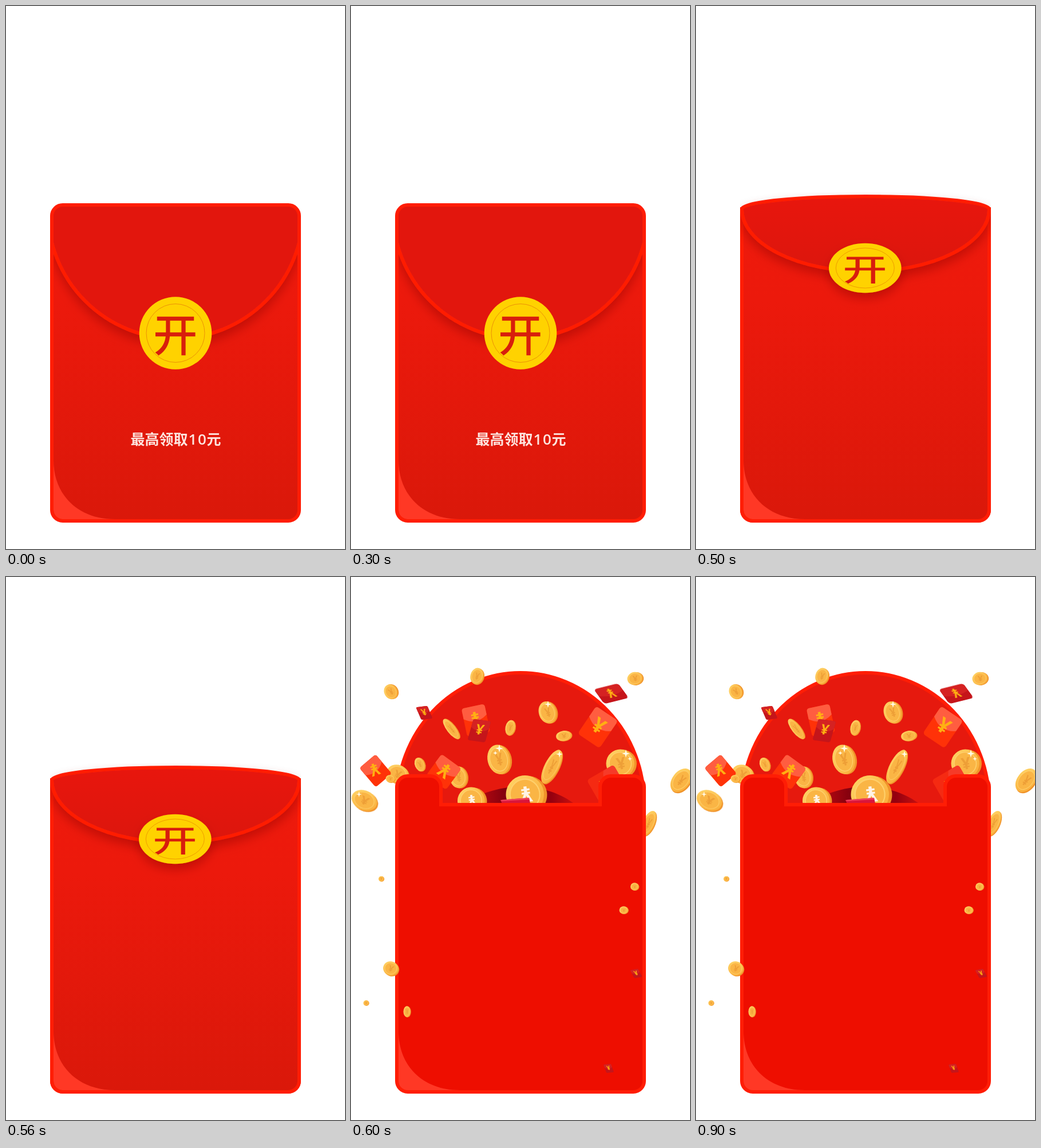
Animation, 592 px wide and 947 px high, one loop 1100 ms. Source, as an HTML page:

```html
<!DOCTYPE html>
<html lang="zh-CN">
<head>
<meta charset="utf-8">
<title>红包</title>
<style>
  html, body { margin: 0; width: 100%; height: 100%; overflow: hidden; background: #fff; }
  svg { display: block; width: 100%; height: 100%; }
  text { font-family: "Noto Sans CJK SC", "Noto Sans CJK", sans-serif; }
  .offer { font-size: 25px; font-weight: 700; fill: #fde5df; }
  .digit { font-family: "Open Sans", "Noto Sans", sans-serif; font-weight: 600; font-size: 26px; }
  .yen { font-family: "Noto Sans", sans-serif; font-weight: 700; text-anchor: middle; }
  .edge { stroke: #ff1d05; stroke-width: 6; }
  .scene { opacity: 0; animation: 1100ms step-end infinite; }
  #closed { animation-name: closed; }
  #lifting { animation-name: lifting; }
  #open { animation-name: open; }
  @keyframes closed { 0% { opacity: 1 } 45.4545% { opacity: 0 } 100% { opacity: 0 } }
  @keyframes lifting { 0% { opacity: 0 } 45.4545% { opacity: 1 } 54.5454% { opacity: 0 } 100% { opacity: 0 } }
  @keyframes open { 0% { opacity: 0 } 54.5454% { opacity: 1 } 100% { opacity: 1 } }
</style>
</head>
<body>
<svg viewBox="0 0 592 947">
  <defs>
    <linearGradient id="paper" gradientUnits="userSpaceOnUse" x1="0" y1="350" x2="0" y2="895">
      <stop offset="0" stop-color="#ef1a0c"/>
      <stop offset=".3" stop-color="#ec190c"/>
      <stop offset="1" stop-color="#da180a"/>
    </linearGradient>
    <linearGradient id="flap" x2="0" y2="1">
      <stop offset="0" stop-color="#e8190e"/>
      <stop offset="1" stop-color="#dc190c"/>
    </linearGradient>
    <linearGradient id="gold" x2="1" y2="1">
      <stop offset="0" stop-color="#ffd668"/>
      <stop offset="1" stop-color="#f9a935"/>
    </linearGradient>
    <linearGradient id="mouth">
      <stop offset="0" stop-color="#d50d12"/>
      <stop offset=".4" stop-color="#80000e"/>
      <stop offset=".8" stop-color="#95000f"/>
      <stop offset="1" stop-color="#c8100f"/>
    </linearGradient>
    <filter id="shadow" x="-20%" y="-20%" width="140%" height="160%">
      <feDropShadow dx="0" dy="10" stdDeviation="9" flood-color="#8a0a00" flood-opacity=".42"/>
    </filter>
    <clipPath id="inside"><rect x="80" y="347" width="432" height="551" rx="19"/></clipPath>
    <clipPath id="below"><path d="M77 325H515V898H77z"/></clipPath>
    <clipPath id="aboveSlot"><path d="M0 0H592V394H0z"/></clipPath>
    <path id="corner" fill="#ff3825" d="M83 792C83 852 125 895 190 895H99A16 16 0 0 1 83 879z"/>
    <g id="seal">
      <circle r="63.3" fill="#ffd200"/>
      <circle r="51" fill="none" stroke="#e98a08" stroke-width=".9"/>
      <text x="-38.2" y="31.5" font-size="76" fill="#d81e0c" stroke="#d81e0c" stroke-width="1.4">开</text>
    </g>
  </defs>

  <g id="closed" class="scene">
    <rect x="80" y="347" width="432" height="551" rx="19" fill="url(#paper)"/>
    <g clip-path="url(#inside)">
      <circle class="edge" cx="296" cy="357" r="223" fill="#e2190d" filter="url(#shadow)"/>
    </g>
    <use href="#corner"/>
    <rect class="edge" x="80" y="347" width="432" height="551" rx="19" fill="none"/>
    <use href="#seal" x="296" y="570.5"/>
    <text class="offer" y="765"><tspan x="217.5">最高领取</tspan><tspan class="digit" x="318.5">1</tspan><tspan class="digit" x="335">0</tspan><tspan x="350.5">元</tspan></text>
  </g>

  <g id="lifting" class="scene">
    <path class="edge" fill="url(#paper)" d="M80 354H512V879A19 19 0 0 1 493 898H99A19 19 0 0 1 80 879z"/>
    <use href="#corner"/>
    <path class="edge" fill="none" d="M80 370V879A19 19 0 0 0 99 898H493A19 19 0 0 0 512 879V370"/>
    <g clip-path="url(#below)">
      <path class="edge" fill="url(#flap)" filter="url(#shadow)"
        d="M80 354A216 22 0 0 1 512 354A216 109 0 0 1 80 354z"/>
    </g>
    <g filter="url(#shadow)"><use href="#seal" transform="translate(295.3 457) scale(1 .685)"/></g>
  </g>

  <g id="open" class="scene">
    <ellipse class="edge" cx="296" cy="395" rx="216" ry="228" fill="#e6190e"/>
    <g clip-path="url(#aboveSlot)">
      <path fill="url(#mouth)" d="M195 394C235 374 262 366 295 366S360 374 388 394z"/>
    </g>
    <g id="behind"></g>
    <g id="slot" clip-path="url(#aboveSlot)"></g>
    <path class="edge" fill="#ee0e00" d="M80 366A19 19 0 0 1 99 347H138A19 19 0 0 1 157 366V397H435V366A19 19 0 0 1 454 347H493A19 19 0 0 1 512 366V879A19 19 0 0 1 493 898H99A19 19 0 0 1 80 879z"/>
    <use href="#corner"/>
    <g id="front"></g>
  </g>
</svg>
<script>
  const add = (id, markup) => document.getElementById(id).insertAdjacentHTML('beforeend', markup);

  const yen = (size, color, turn = 0) =>
    `<text class="yen" y="${size * .36}" font-size="${size}" fill="${color}" transform="rotate(${turn})">¥</text>`;

  const spark = (x, y, r) => {
    const q = r * .22;
    return `<path fill="#fffbe8" d="M${x} ${y - r}l${q} ${r - q} ${r - q} ${q} ${q - r} ${q} ${-q} ${r - q} ${-q} ${q - r} ${q - r} ${-q} ${r - q} ${-q}z"/>`;
  };

  // A tilted coin: rim, face, inner ring and mark squeezed to the same ellipse.
  function coin(layer, x, y, rx, ry, turn = 0, mark = '#ee9f37', markTurn = 0) {
    const rim = Math.min(rx, ry) * .1;
    add(layer, `<g transform="translate(${x} ${y}) rotate(${turn})">
      <ellipse cx="${rim}" cy="${rim * .5}" rx="${rx - rim * .5}" ry="${ry - rim * .5}" fill="#f0932a"/>
      <ellipse cx="${-rim * .5}" rx="${rx - rim * .5}" ry="${ry - rim * .5}" fill="url(#gold)"/>
      <ellipse cx="${-rim * .5}" rx="${rx * .74}" ry="${ry * .76}" fill="#fab545" stroke="#ffd06c" stroke-width="${rim * .6}"/>
      <g transform="scale(${rx / 20} ${ry / 20})">${yen(22, mark, markTurn)}</g></g>`);
  }

  function packet(layer, x, y, w, h, turn, tone, flapTone, markTurn = 0, skew = 0) {
    const l = -w / 2, t = -h / 2, r = w * .12;
    add(layer, `<g transform="translate(${x} ${y}) rotate(${turn}) skewX(${skew})">
      <rect x="${l}" y="${t}" width="${w}" height="${h}" rx="${r}" fill="${tone}"/>
      <path fill="${flapTone}" d="M${l} ${t + r}q0 ${-r} ${r} ${-r}h${w - 2 * r}q${r} 0 ${r} ${r}v${h * .28}q${-w / 2} ${h * .3} ${-w} 0z"/>
      <g transform="translate(0 ${-h * .06})">${yen(Math.min(w, h) * .8, '#ffb012', markTurn)}</g></g>`);
  }

  const bright = ['#ff3208', '#ff5d40'], dark = ['#c5151a', '#d52222'];

  coin('behind', 70, 200, 12, 14, -30);
  coin('behind', 220.5, 173, 12, 15, 15);
  coin('behind', 496.5, 177, 14, 12, -8);
  coin('behind', 344, 236, 16, 20.5, -18);
  coin('behind', 175.5, 265, 8, 22, -38);
  coin('behind', 278.5, 263, 9, 14, 12);
  coin('behind', 372, 277, 14, 9.5, -8);
  coin('behind', 259, 318, 20.5, 27, -14);
  coin('behind', 351, 331, 13, 33, 27);
  coin('behind', 471.5, 325, 26, 26, -10);
  coin('behind', 120.5, 327, 9, 13, -22);
  coin('behind', 188, 349, 16, 20, -10);
  coin('behind', 82, 344, 20, 17, 20);
  coin('behind', 24, 390, 24, 18, 25);
  coin('behind', 577, 355, 16, 24, 38);
  coin('behind', 520, 430, 11, 24, 24);
  [[259, 299, 7], [252, 307, 4], [344, 222, 6], [364, 309, 6], [480, 308, 7], [487, 317, 4], [14, 379, 5]]
    .forEach(s => add('behind', spark(...s)));

  packet('behind', 43, 338, 37, 44, -40, ...bright, 200);
  coin('behind', 69, 352, 8.5, 7, 10);
  packet('behind', 162, 340, 43, 46, 36, ...bright, 180);
  packet('behind', 218, 250, 41, 50, -12, ...bright, 180);
  packet('behind', 224, 268, 31, 38, 8, ...dark, 0, -8);
  packet('behind', 431, 262, 46, 58, 34, ...bright);
  packet('behind', 446, 360, 44, 54, 60, '#f52a12', '#f63a28', 180);
  packet('behind', 128, 237, 20, 23, -8, ...dark, 0, 15);
  packet('behind', 454.5, 203.5, 44, 29, -14, ...dark, 180, 22);

  coin('slot', 211, 390, 25, 25, -8, '#fff3e6', 180);
  coin('slot', 305.5, 379, 35, 35, -8, '#fff3e6', 180);
  add('slot', '<path fill="#d9153b" d="M261 389L311 385 314 400H266z"/><path fill="#f0405a" d="M261 389L311 385V388L263 391z"/>');

  coin('front', 53, 526.5, 5, 5);
  coin('front', 495.5, 540, 7.5, 7);
  coin('front', 476.5, 581, 8, 7);
  coin('front', 70, 683, 14, 13, 20);
  coin('front', 26.5, 743, 5, 5);
  coin('front', 98, 758, 6.5, 10);
  packet('front', 498, 691.5, 14, 15, -10, ...dark, 0, 18);
  packet('front', 450, 857, 13, 15, -6, ...dark, 0, 14);
</script>
</body>
</html>
```
